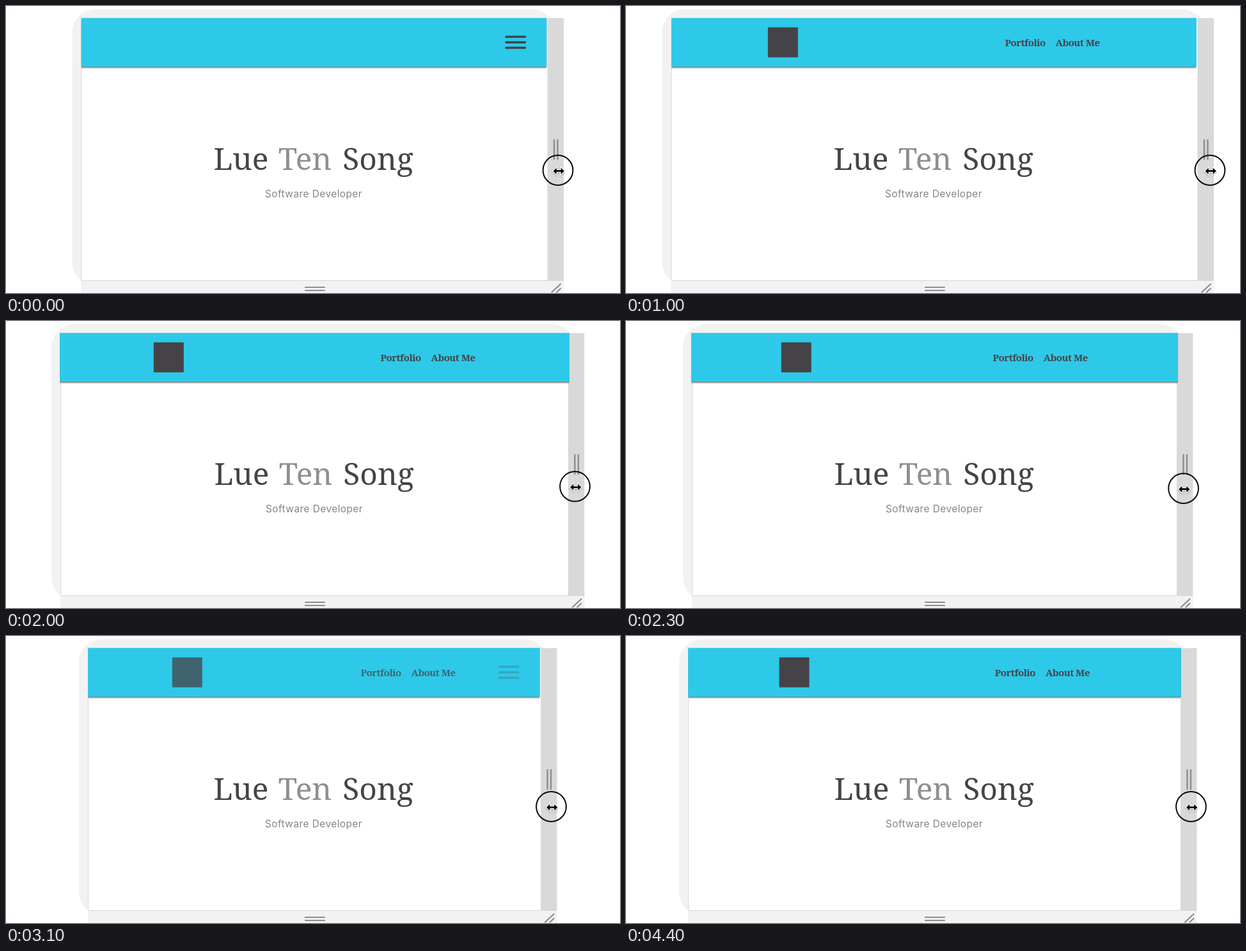
These frames come from a looping animation (960x450 px, 4500 ms). An HTML page with a canvas:

```html
<!DOCTYPE html>
<html lang="en">
<head>
<meta charset="utf-8">
<title>Resizing a responsive page</title>
<style>
html, body { margin: 0; width: 100%; height: 100%; overflow: hidden; background: #fff; }
canvas { display: block; }
</style>
</head>
<body>
<canvas id="stage" width="960" height="450"></canvas>
<script>
const g = document.getElementById('stage').getContext('2d');
const LOOP = 4500, STEP = 100, SPAN = 964.5;
const INK = '#454348', GRIP = '#8d8d8d';
const SLAB = '"Roboto Slab", "Noto Serif", serif';
const SANS = 'Montserrat, Inter, sans-serif';

const progress = (t, from, to) => Math.max(0, Math.min(1, (t - from) / (to - from)));
const swing = (...span) => (1 - Math.cos(progress(...span) * Math.PI)) / 2;
const glide = (...span) => Math.sin(progress(...span) * Math.PI / 2);

// Left edge of the window: two pulls outward, one push inward, one pull outward.
const leftAt = t => 117.5
  - 45.5 * glide(t, 100, 720)
  - 6 * swing(t, 900, 1200)
  + 62 * swing(t, 1400, 3000)
  - 31 * glide(t, 3900, 4400);

// Visibility of the wide navigation; the rest goes to the menu icon.
function navShare(t) {
  if (t < 100) return 0;
  return t < 4100 ? 1 - progress(t, 3000, 3400) : 1;
}

function rect(x, y, w, h, fill) {
  g.fillStyle = fill;
  g.fillRect(x, y, w, h);
}

function rounded(x, y, w, h, radius, fill) {
  g.fillStyle = fill;
  g.beginPath();
  g.roundRect(x, y, w, h, radius);
  g.fill();
}

function line(x1, y1, x2, y2, color, width) {
  g.strokeStyle = color;
  g.lineWidth = width;
  g.lineCap = 'round';
  g.beginPath();
  g.moveTo(x1, y1);
  g.lineTo(x2, y2);
  g.stroke();
}

function label(text, x, y, font, fill, align = 'center', spacing = 0) {
  g.font = font;
  g.fillStyle = fill;
  g.textAlign = align;
  g.letterSpacing = spacing + 'px';
  g.fillText(text, x, y);
}

function drawWindow(left, right) {
  const width = right - left;
  rounded(left - 14, 5, width + 25, 433, 36, '#f2f2f2');
  rect(left, 431, width + 25, 19, '#f2f2f2');
  rect(left, 19, width + 25, 412, '#d9d9d9');
  rect(left + 1, 19, width - 1.5, 411, '#fff');

  for (const x of [10, 15.5]) line(right + x, 210, right + x, 240, GRIP, 2.4);
  for (const y of [441, 446]) line(468, y, 498, y, GRIP, 2.2);
  line(right + 6.5, 448.5, right + 20, 436, GRIP, 2.2);
  line(right + 14, 448.5, right + 20, 443, GRIP, 2.2);
}

function drawHeader(left, mid, nav) {
  const width = 2 * (mid - left), right = left + width;
  g.save();
  g.shadowColor = 'rgba(0,0,0,.6)';
  g.shadowBlur = 2.5;
  g.shadowOffsetY = 1.5;
  g.beginPath();
  g.rect(left, 18.5, width, 82);
  g.clip();
  rounded(left, 18.5, width, 76.7, [0, 0, 1.5, 1.5], '#2ec9e8');
  g.restore();

  const reach = width / 3 - 14;
  const font = 'bold 15px ' + SLAB;
  g.globalAlpha = nav;
  rect(mid - reach, 33.5, 47, 47, INK);
  label('Portfolio', mid + reach - 85.5, 63, font, INK, 'right', -.5);
  label('About Me', mid + reach - .5, 63, font, INK, 'right', -.5);

  g.globalAlpha = 1 - nav;
  for (const y of [48.3, 57, 65.6]) line(right - 63.5, y, right - 34, y, INK, 3.5);
  g.globalAlpha = 1;
}

function drawTitle(shift) {
  const font = '48px ' + SLAB;
  label('Lue', 367.5 + shift, 257, font, INK);
  label('Ten', 467.5 + shift, 257, font, '#8f8f8f');
  label('Song', 581.5 + shift, 257, font, INK);
  label('Software Developer', 481 + shift, 300, '15.5px ' + SANS, '#858585', 'center', .4);
}

function drawPointer(x, y) {
  g.strokeStyle = '#0c0c0c';
  g.lineWidth = 2;
  g.beginPath();
  g.arc(x, y, 23.4, 0, 7);
  g.stroke();

  g.save();
  g.translate(x + 1.2, y + 1.2);
  const arrow = new Path2D('M-3.5 1.4V5L-8.7 0L-3.5-5V-1.4H3.5V-5L8.7 0L3.5 5V1.4Z');
  g.shadowColor = 'rgba(0,0,0,.35)';
  g.shadowBlur = 2;
  g.shadowOffsetY = 1;
  g.strokeStyle = '#fff';
  g.lineWidth = 2.4;
  g.stroke(arrow);
  g.shadowColor = 'transparent';
  g.fillStyle = '#000';
  g.fill(arrow);
  g.restore();
}

function draw(now) {
  const t = Math.floor(now % LOOP / STEP) * STEP;
  const left = leftAt(t);
  const shift = t >= 1300 && t < 3000 || t >= 4200 ? 1 : 0;
  rect(0, 0, 960, 450, '#fff');
  drawWindow(left, SPAN - left);
  // The page trails the window a little, and the window trails the pointer.
  drawHeader(leftAt(t - 20), 481.5 + shift, navShare(t));
  drawTitle(shift);
  drawPointer(SPAN - leftAt(t + 100) + 16, 257.5 + 10 * swing(t, 1600, 3000));
}

let start;
function tick(now) {
  start ??= now;
  draw(now - start);
  requestAnimationFrame(tick);
}
requestAnimationFrame(tick);
</script>
</body>
</html>
```
